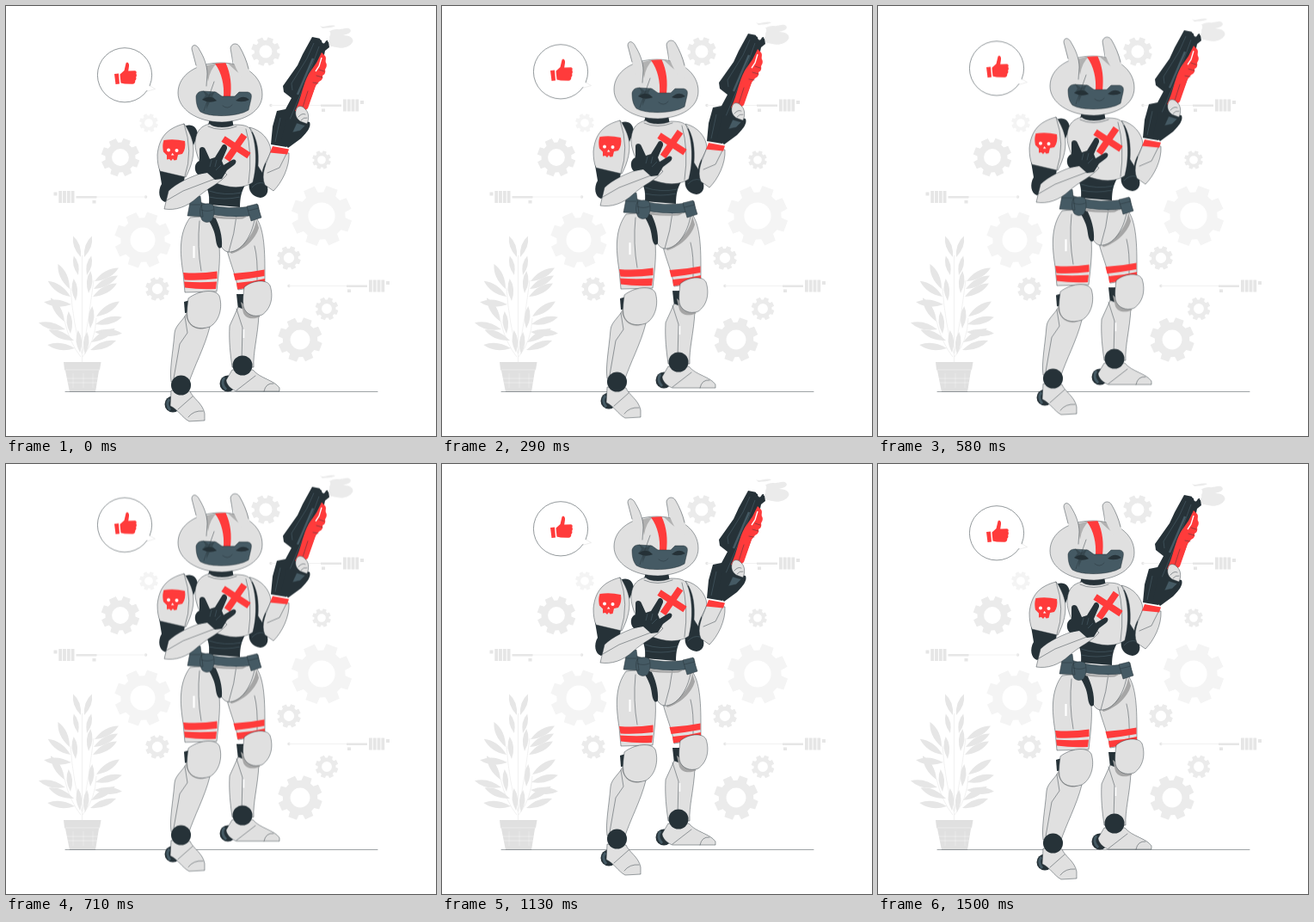
Write an HTML page that moves like this. It is 500 px wide and 500 px high and loops after 1.54 s.

```html
<!DOCTYPE html>
<html lang="en">
<head>
<meta charset="utf-8">
<title>Robot soldier</title>
<style>
html, body { margin: 0; width: 100%; height: 100%; overflow: hidden; background: #fff; }
svg { display: block; width: 100%; height: 100%; }
.w { fill: #e0e0e0; stroke: #263238; stroke-width: .45; stroke-linejoin: round; }
.f { fill: #e0e0e0; }
.d { fill: #263238; }
.s { fill: #455a64; stroke: #263238; stroke-width: .5; }
.r { fill: #ff3b3b; }
.g { fill: #a6a6a6; }
.l { fill: none; stroke: #263238; stroke-width: .45; stroke-linecap: round; }
.h { fill: none; stroke: #455a64; stroke-width: .7; }
</style>
</head>
<body>
<svg viewBox="0 0 500 500">
  <g id="back"></g>

  <g id="plant">
    <path d="M88.5 414V290M89 404Q97 360 102 319M88 404Q78 370 75 328M89 408Q104 390 105 363M87 408Q74 392 68 366" fill="none" stroke="#ebebeb" stroke-width=".7"/>
    <path d="M67 414h43.500l-1.500 9-1 1-4 25H74l-5-25-1-1z" fill="#e0e0e0"/>
    <path d="M68.500 423H109M70 433H107M72 438H106M78 427v17M90 427v17M101 427v17" fill="none" stroke="#fff" stroke-width=".5" opacity=".6"/>
  </g>
  <path class="l" d="M69 448.500H432"/>

  <g class="float">
    <path d="M166 92 173.500 96.500 163 99.500" fill="#fff" stroke="#ddd" stroke-width=".5"/>
    <circle cx="138" cy="80.300" r="31.600" fill="#fff" stroke="#263238" stroke-width=".5"/>
    <path d="M164 91 171 96.500 160 99" fill="#fff"/>
    <path class="r" d="M126 79l5-.5 1 12-4.500.5zM132.500 79.500l5-4.500 2-8.500c2-2.500 4 .5 3.500 3.500l-.8 5.500 7.800-.3c2 .5 2 2.500 1.300 3.500 1 1.500.6 3-.2 4 .8 2 .2 3-.8 3.800.2 3-1.300 4.300-3.300 4.300l-9-.3-4.500-1z"/>
  </g>

  <g class="float">
    <!-- smoke -->
    <path d="M365 23c5 3 9-2 18 0-4 3-10 2-15 3zM372 43c-3-10 4-16 13-16 6 1 11-3 15 0 3 3-2 6-8 7 8 0 13 4 11 8-3 6-12 8-19 6-5-1-8-1-12-5z" fill="#ebebeb"/>

    <!-- gun arm -->
    <path class="d" d="M284 146c12 2 18 8 19 20l-2 38c6 8 4 18-5 19-10-1-15-9-13-18z"/>
    <path class="h" d="M293 154l2 36M286 211q6-7 14-5"/>
    <path class="w" d="M283 141c14 3 24 15 25 27-2 9-9 16-10 26l-5-8c1-15 0-32-10-45z"/>
    <path class="w" d="M301 208c-5-12 1-24 7-39l21 2c1 16-8 34-18 44z"/>
    <path class="l" d="M304 194l14-6 8-16"/>
    <path class="r" d="M310 163l19 3.500-2 6-20-2z"/>
    <path class="d" d="M356 36l10 2 9 4 1 6-5 4-5 24-14 38-10 14-16 36-18-3 2-21 5-18 10-2 7-13-9-7-1-7 17-24 6-13z"/>
    <path class="h" d="M358 43l-8 18-18 29 1 8M364 47l-12 33-22 52M319 130l-6 28"/>
    <path d="M357 61l-18 42" stroke="#455a64" stroke-width="2.500"/>
    <path class="r" d="M367 54l4 4c2 3 0 5 1 8 2 3 0 6-1 8 1 4-1 6-3 7 1 4-2 6-4 7l-4 5-9 26-7 6-8-3c8-16 9-31 16-43l9-13z"/>
    <path d="M367 60l-3 10-4 6" fill="none" stroke="#fff" stroke-width="1.400"/>
    <path class="l" d="M364 74l6 2M361 81l7 2M357 89l6 1M351 99l-8 25"/>
    <path class="d" d="M340 132l13 3c2 5-2 11-10 19l-15 11-8-8 6-26z"/>
    <path class="s" d="M338 136l10 3-6 6-9 2z"/>
    <path class="w" d="M337 122c1-6 6-7 10-3 5 4 6 11 3 18l-8-3c-4-3-6-7-5-12z"/>
    <path class="l" d="M340 129q4-5 8-3M343 133q3-4 7-3"/>
    <path d="M366 33c0-5 5-7 8-4 4 0 4 4 2 7 1 4-2 6-4 4-1 5-5 4-5 0-3-1-3-5-1-7z" fill="#fff"/>
    <path class="d" d="M372.500 40h1.500v6h-1.500z"/>

    <!-- right leg -->
    <path class="d" d="M268 335h12v17l-10 1z"/>
    <path class="w" d="M290 245c8 10 11 28 11 60v20l-31 5c-3-18-9-30-13-46z"/>
    <path class="g" d="M291 248c-2 18-16 33-31 37l2 3c14-4 28-16 32-30z"/>
    <path class="l" d="M289 279q4 15 3 40"/>
    <path class="r" d="M264.500 311q19-1 36-4.500v7.500q-17 3-34 5zM268 322q17-1 33-5v7.500q-15 3-32 5z"/>
    <path class="w" d="M270 350l-10 22c-1 18 1 34 3 48h25c-1-17 5-37 6-61z"/>
    <path class="l" d="M268 352l7 22-1 40"/>
    <path d="M276.500 376v10" stroke="#fff" stroke-width="1.500"/>
    <path class="g" d="M273 344l3 13c3 7 12 8 20 4l-8-5z"/>
    <path class="w" d="M277 327c9-8 26-10 30-2 4 12 2 26-9 34-10 4-20-1-22-10-1-8 0-14 1-22z"/>
    <circle class="d" cx="258" cy="439" r="9.500"/>
    <path d="M254 432q-5 7 2 14" fill="none" stroke="#455a64" stroke-width="3"/>
    <path class="w" d="M263 423h24c8 10 25 12 31 21v4h-50c-6-2-12-8-12-13z"/>
    <path class="l" d="M268 447l22-17M300 448q2-10 11-9"/>
    <circle class="d" cx="275" cy="418" r="11.500"/>

    <!-- left leg and pelvis -->
    <path class="w" d="M237 241l53 2c-3 22-14 41-29 43-8 1-13-7-15-20z"/>
    <path class="l" d="M268 244q-2 20-9 42"/>
    <path class="d" d="M207 344l10-3v15l-9 1z"/>
    <path class="w" d="M214 246c-13 18-12 40-8 65l2 22 37-1c2-20 6-44 1-66l-12-22z"/>
    <path class="l" d="M225 250q-3 30 2 58"/>
    <path d="M218.500 279v14" stroke="#fff" stroke-width="2.200"/>
    <path class="r" d="M206 310q20 1.500 39.500-1.500v8.500q-19 2.500-38 1.500zM207 320.500q19 1.500 38 0l-1 8.500q-19 1-36-1.500z"/>
    <path class="w" d="M211 354c-2 10-14 16-15 26-2 24-6 42-4 57l20 3c7-22 19-43 25-67z"/>
    <path class="l" d="M208 361l3 19-9 13-7 40"/>
    <path class="g" d="M209 358c1 12 10 20 22 17l10-5z"/>
    <path class="w" d="M212 340c11-9 31-12 36-3 4 12 1 29-11 36-12 4-23 1-26-10-1-9 0-15 1-23z"/>
    <circle class="d" cx="194" cy="463" r="9.500"/>
    <path d="M190 457q-5 6 1 13" fill="none" stroke="#455a64" stroke-width="3"/>
    <path class="w" d="M192 447l22 1c3 8 15 14 17 26v8l-18 1c-8-4-13-14-22-18z"/>
    <path class="l" d="M200 469l17-15M212 478q6-8 17-7"/>
    <circle class="d" cx="203.500" cy="441" r="11.500"/>

    <!-- waist and belt -->
    <path class="d" d="M228 202l50 6c-4 8-6 14-6 26l-36-3c1-11-1-20-8-29z"/>
    <path class="h" d="M236 215q18 6 38 2M236 222q18 4 36 0"/>
    <path class="d" d="M235 248l8-3c5 10 9 23 8 35-3 4-6 0-7-8-1-10-5-17-9-24z"/>
    <path class="s" d="M225 228c20 7 45 9 68 3l2 11c-24 5-45 3-68-2z"/>
    <path class="g" d="M241 243.500q20 4 40 1l-6 3q-18 1-33-1z"/>
    <path class="s" d="M215 223l11-2 3 24-18-1zM227 232c4-3 12-3 14 0 2 7 1 13-2 18-4 2-8 2-11-1-3-6-3-12-1-17zM280 233l12-3 5 16-12 4z"/>
    <path class="l" d="M213 231h13M227 237q7 3 14 0M282 238l12-3"/>

    <!-- chest -->
    <path class="d" d="M237 131h26l2 11h-31zM209 139c8-2 13 2 14 10l-5 13z"/>
    <path class="w" d="M220 158c1-14 8-19 17-21 5 5 20 5 29 1 9 0 15 1 18 5 8 16 8 44 3 62-13 9-31 6-45 0-10-10-23-30-22-47z"/>
    <path class="l" d="M235 140q15 7 33 0M279 143q8 28 3 63"/>
    <path d="M252.500 154.500 282.500 174M277 150 257 179" stroke="#ff3b3b" stroke-width="7.800"/>

    <!-- left arm -->
    <path class="d" d="M178 189l30 8-2 14-21 17c-7-2-9-13-4-21z"/>
    <path class="w" d="M207 137c-19 5-29 15-31 36 0 8 1 14 3 19l30 7c7-13 11-28 8-41-2-8-6-16-10-21z"/>
    <path class="l" d="M207 137q11 32 1 61"/>
    <path class="r" d="M183.500 156q12-2 24.500 1c1 6 0 11-3 15l-5 1-1.500 6-3 .5-1.500-2-2 2.500-2-2-3 .5v-5l-4-4c-1-6-1-9 .5-13.500z"/>
    <g fill="#fff"><circle cx="189" cy="167.500" r="2"/><circle cx="198.500" cy="168" r="2"/><path d="M193.500 171l2 2.500H192z"/></g>
    <path class="w" d="M184 236l5-21c9-9 26-17 43-22l15-5 10 8c-9 11-22 15-35 27-12 11-25 15-38 13z"/>
    <path class="l" d="M187 226l19-11 42-16"/>
    <path class="d" d="M225 167c0-4 6-4 7 0l5 11 6-2 8-13c2-4 7-1 6 3l-6 14 2 5 10-6c5-2 6 3 2 6l-8 6-6 10-8 1-9-8-11 2c-5-5-4-14 2-16z"/>
    <path class="h" d="M239 179l-2 8M245 179l-2 8M250 185l-6 6"/>

    <!-- head -->
    <path class="w" d="M200 101C200 80 222 66 250 66s48 16 48 37c0 19-20 31-47 32-29 0-51-15-51-34z"/>
    <path class="g" d="M231 70l15-4q-9 7-11 22zM257 66l9 2 13 16q-12-8-22-18z" opacity=".8"/>
    <path class="r" d="M243 67q6-1 12.500-.8c6 13 7 26 5.500 39.800h-8c1-14-2-28-10-39z"/>
    <path class="f" d="M216 50c0-6 6-6 9 1 5 8 9 18 9 28l-1 16c-8-8-12-25-17-45zM261 49c1-6 8-7 11-1 6 10 12 24 12 35l-4 8c-10-10-17-26-19-42z"/>
    <path class="l" d="M221 69l-5-19c0-6 6-6 9 1 5 8 9 18 9 28l-1 14M264 67l-3-18c1-6 8-7 11-1 4 7 8 16 10 25"/>
    <path class="s" d="M221 105c1-4 4-6 8-6l15 1 7 5h15l5-5h10c4 1 5 3 4 8l-3 13c-12 8-45 9-56 2-4-5-5-11-5-18z"/>
    <path class="d" d="M228 109q9-7 17 1-8 4-17-1zM267 110q9-8 16-1-8 4-16 1z"/>
    <path class="l" d="M252 116q6 5 11-1" stroke-width="1"/>
    <path class="d" d="M229 98l7 5 7-4-3 6 5 6-7-2-5 11 1-12-6 1 4-5z" opacity=".45"/>
    <path class="l" d="M242 88l-12 34"/>
  </g>
</svg>
<script>
const $ = s => document.querySelector(s);
const add = (parent, d, fill) => {
  const el = document.createElementNS('http://www.w3.org/2000/svg', 'path');
  el.setAttribute('d', d);
  el.setAttribute('fill', fill);
  el.setAttribute('fill-rule', 'evenodd');
  $(parent).append(el);
};
const disc = (x, y, r) => `M${x - r} ${y}a${r} ${r} 0 1 0 ${2 * r} 0a${r} ${r} 0 1 0 ${-2 * r} 0z`;
const box = (x, y, w, h) => `M${x} ${y}h${w}v${h}h${-w}z`;
const light = '#f4f4f4', grey = '#ebebeb';

function gear(x, y, R, fill = grey) {
  const pts = [];
  for (let i = 0; i < 32; i++) {
    const a = Math.PI / 4 * (Math.floor(i / 4) + .45 + [-.35, -.25, .25, .35][i % 4]);
    const r = i % 4 % 3 ? R : R * .78;
    pts.push(`${x + r * Math.cos(a)} ${y + r * Math.sin(a)}`);
  }
  add('#back', `M${pts.join('L')}z` + disc(x, y, R * .44), fill);
}

// Line with an end dot, then rod, bars and tip; dir mirrors it.
function bolt(x, y, len, dir) {
  const bar = (a, dy, w, h) => box(dir > 0 ? x + a : x - a - w, y + dy, w, h);
  let d = disc(x, y, 1.8) + bar(0, -.25, len, .5) + bar(len, -1, 24, 2.6) + bar(len + 1, 4, 4, 3.5);
  for (let i = 0; i < 4; i++) d += bar(len + 26 + i * 4.8, -7, 3.8, 14);
  add('#back', d + bar(len + 46, -5.5, 4, 4), '#e6e6e6');
}

// Angle in degrees from upright, positive to the right.
function leaf(x, y, angle, len) {
  const a = angle * Math.PI / 180, dx = len * Math.sin(a), dy = -len * Math.cos(a), w = .25;
  add('#plant', `M${x} ${y}q${dx * .55 - dy * w} ${dy * .55 + dx * w} ${dx} ${dy}` +
    `q${-dx * .45 + dy * w} ${-dy * .45 - dx * w} ${-dx} ${-dy}z`, '#e6e6e6');
}

// Leaves fan outwards down a branch, with one upright leaf inside.
function twig(x, y, side, angle, turn, count) {
  for (let i = 0; i < count; i++) leaf(x - side * i, y + 9 * i, side * (angle + turn * i), 32);
  leaf(x - side * 7, y + 14, side * 5, 26);
}

gear(302, 53, 17);
gear(133, 176, 22.5);
gear(166, 136, 11, light);
gear(159, 272, 33, light);
gear(176, 329, 14);
gear(367, 244, 35.5, light);
gear(367, 179, 11);
gear(329, 293, 14);
gear(373, 352, 13.5);
gear(342, 388, 26);
bolt(162.5, 222, 57, -1);
bolt(308, 115.5, 58, 1);
bolt(329, 325.5, 67, 1);

for (const s of [-1, 1]) {
  leaf(89 + 2 * s, 292, 20 * s, 26);
  leaf(89 + 5 * s, 313, 13 * s, 23);
}
twig(103, 320, 1, 61, 0, 3);
twig(74, 329, -1, 25, 30, 3);
twig(105, 361, 1, 57, 18, 3);
twig(68, 367, -1, 30, 46, 2);
twig(99, 391, 1, 60, 10, 2);
twig(79, 389, -1, 67, 16, 2);

// Float up 10px and back linearly in 1.5s, held at 24 poses a second.
const loop = 1540, last = 36;
const steps = [];
for (let k = 0; k <= last; k++) {
  const up = 10 * (1 - Math.abs(1 - 2 * k / last));
  steps.push({
    offset: k ? (k * 1000 / 24 - 5) / loop : 0,
    transform: `translateY(${-up}px)`,
    easing: 'steps(1, end)'
  });
}
steps.push({ offset: 1, transform: 'translateY(0px)' });
document.querySelectorAll('.float').forEach(el => el.animate(steps, { duration: loop, iterations: Infinity }));
</script>
</body>
</html>
```
